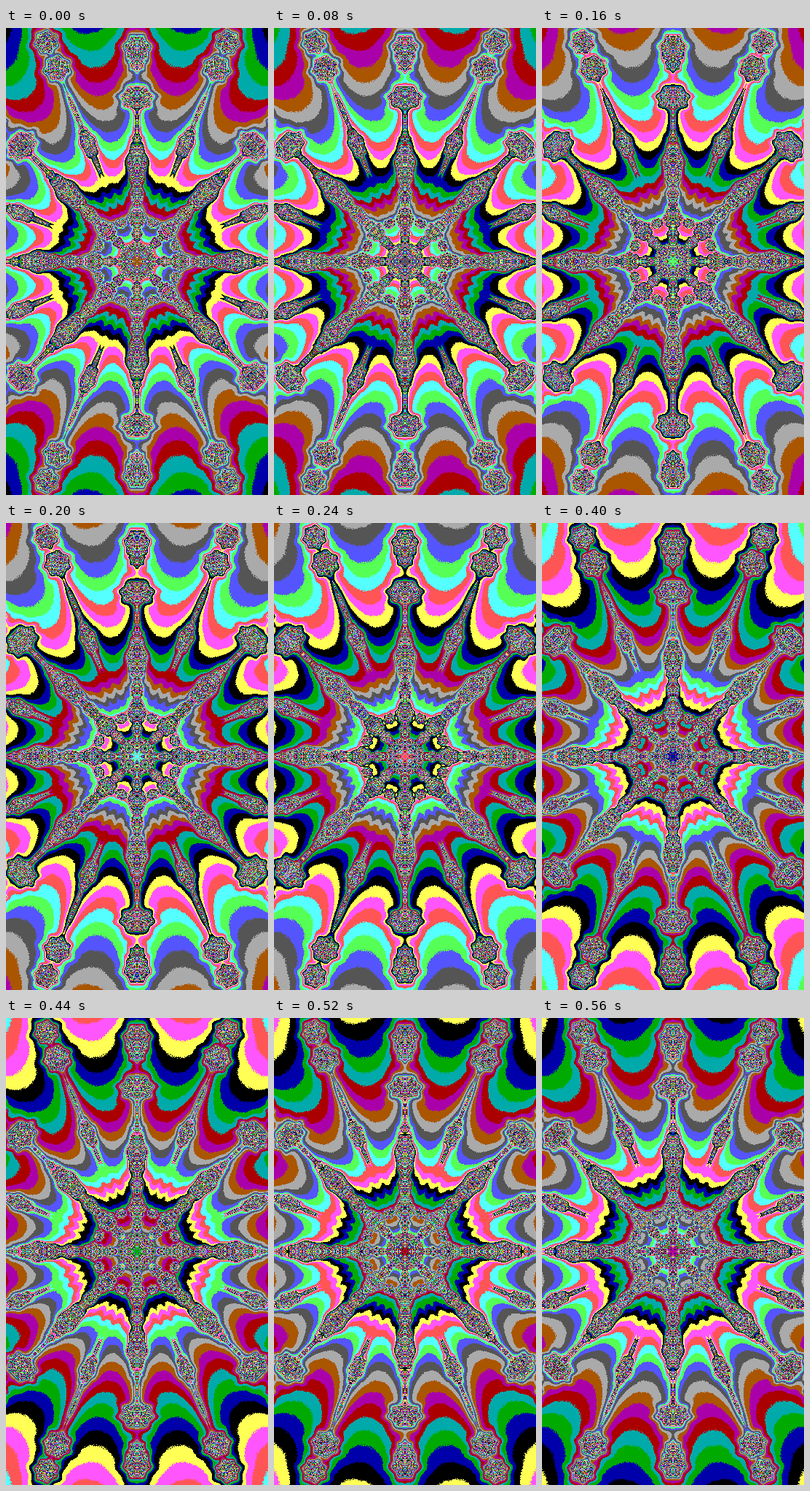
An HTML page with a canvas for the animation above (0.6 s loop, 360x640 px).

```html
<!DOCTYPE html>
<html>
<head>
<meta charset="utf-8">
<style>
  html, body { margin: 0; overflow: hidden; background: #000; }
  canvas { display: block; }
</style>
</head>
<body>
<canvas width="360" height="640"></canvas>
<script>
const W = 360, H = 640, COLORS = 15, STEP_MS = 40, HALF_SECTOR = Math.PI / 8;
const ctx = document.querySelector('canvas').getContext('2d');
const image = ctx.createImageData(W, H);
const pixels = new Uint32Array(image.data.buffer);
const palette = ['000000', '0000aa', '00aa00', '00aaaa', 'aa0000', 'aa00aa', 'aa5500', 'aaaaaa',
  '555555', '5555ff', '55ff55', '55ffff', 'ff5555', 'ff55ff', 'ffff55']
  .map(hex => parseInt('ff' + hex.slice(4) + hex.slice(2, 4) + hex.slice(0, 2), 16));

// Dust islands in log-polar space: radius, half length, half width
const spokeIslands = [
  [325, .04, .04], [286, .05, .052], [217, .1, .006], [173, .1, .045], [143, .06, .008], [56, .09, .12]
];
const axisIslands = [
  [291, .055, .05], [271, .03, .03], [224, .06, .085], [186, .1, .008], [168, .025, .025],
  [130, .2, .085], [88, .2, .075], [58, .2, .18], [36, .25, .15]
];

const hash = (a, b) => {
  const s = Math.sin(a * 127.1 + b * 311.7) * 43758.5453;
  return s - Math.floor(s);
};
const smooth = (from, to, x) => {
  const t = Math.min(1, Math.max(0, (x - from) / (to - from)));
  return t * t * (3 - 2 * t);
};
// Rise of the bands along a ray, fading to nothing at the petal's middle
const wall = (d, width) => Math.max(0, 1 - d / width) ** 2.5;

// Influence of one island; infinite inside it
function pull([radius, a, b], logR, phi) {
  const u = logR - Math.log(radius);
  const bumps = 1 + .07 * Math.cos(7 * Math.atan2(phi / b, u / a));
  const q = Math.hypot(u / a, phi / b) * bumps;
  if (q <= 1) return Infinity;
  const d = q * (q - 1) / Math.hypot(u / a / a, phi / b / b);
  return ((.02 + .35 * b) / d) ** 3;
}

function level(col, row) {
  const x = col + .5, y = row + .5;
  const r = Math.hypot(x, y), logR = Math.log(r);
  const angle = Math.atan2(y, x) % (2 * HALF_SECTOR);
  const phi = Math.abs(angle - HALF_SECTOR), psi = HALF_SECTOR - phi;
  const lo = Math.min(col, row), hi = Math.max(col, row);
  const grain = hash(lo, hi);
  const dust = Math.floor(hash(hi + 7, lo + 3) * COLORS);

  if (r < 9 + 3 * Math.cos(8 * phi)) return grain < .55 ? 6 : dust;
  if (r < 26) return dust;

  let sum = 0;
  for (const island of spokeIslands) sum += pull(island, logR, phi);
  for (const island of axisIslands) sum += pull(island, logR, psi);
  const rise = 1.2 * Math.log(1 + sum);
  if (rise > 7.5) return dust;

  const split = smooth(112, 155, r);
  const walls = 3.5 * (wall(psi, .3 - .1 * split) + split * wall(phi, .2));
  const base = r > 81 ? 1 + Math.log(350 / r) / .081 : 19 + Math.log(81 / r) / .126;
  const scallop = Math.abs(Math.cos(phi * Math.PI / .15)) - .8;
  const lobes = .9 * scallop * Math.exp(-((Math.log(r / 92) / .2) ** 2));
  return Math.max(0, Math.floor(base + rise + walls - .2 - lobes + .14 * (grain - .5)));
}

const levels = new Uint8Array(W * H);
for (let row = 0; row < H / 2; row++) {
  for (let col = 0; col < W / 2; col++) {
    const n = level(col, row);
    for (const py of [H / 2 + row, H / 2 - 1 - row]) {
      for (const px of [W / 2 + col, W / 2 - 1 - col]) levels[py * W + px] = n;
    }
  }
}

let shown = -1;
function draw() {
  const step = Math.floor(performance.now() / STEP_MS) % COLORS;
  if (step !== shown) {
    shown = step;
    for (let i = 0; i < pixels.length; i++) pixels[i] = palette[(levels[i] + step) % COLORS];
    ctx.putImageData(image, 0, 0);
  }
  requestAnimationFrame(draw);
}
draw();
</script>
</body>
</html>
```
